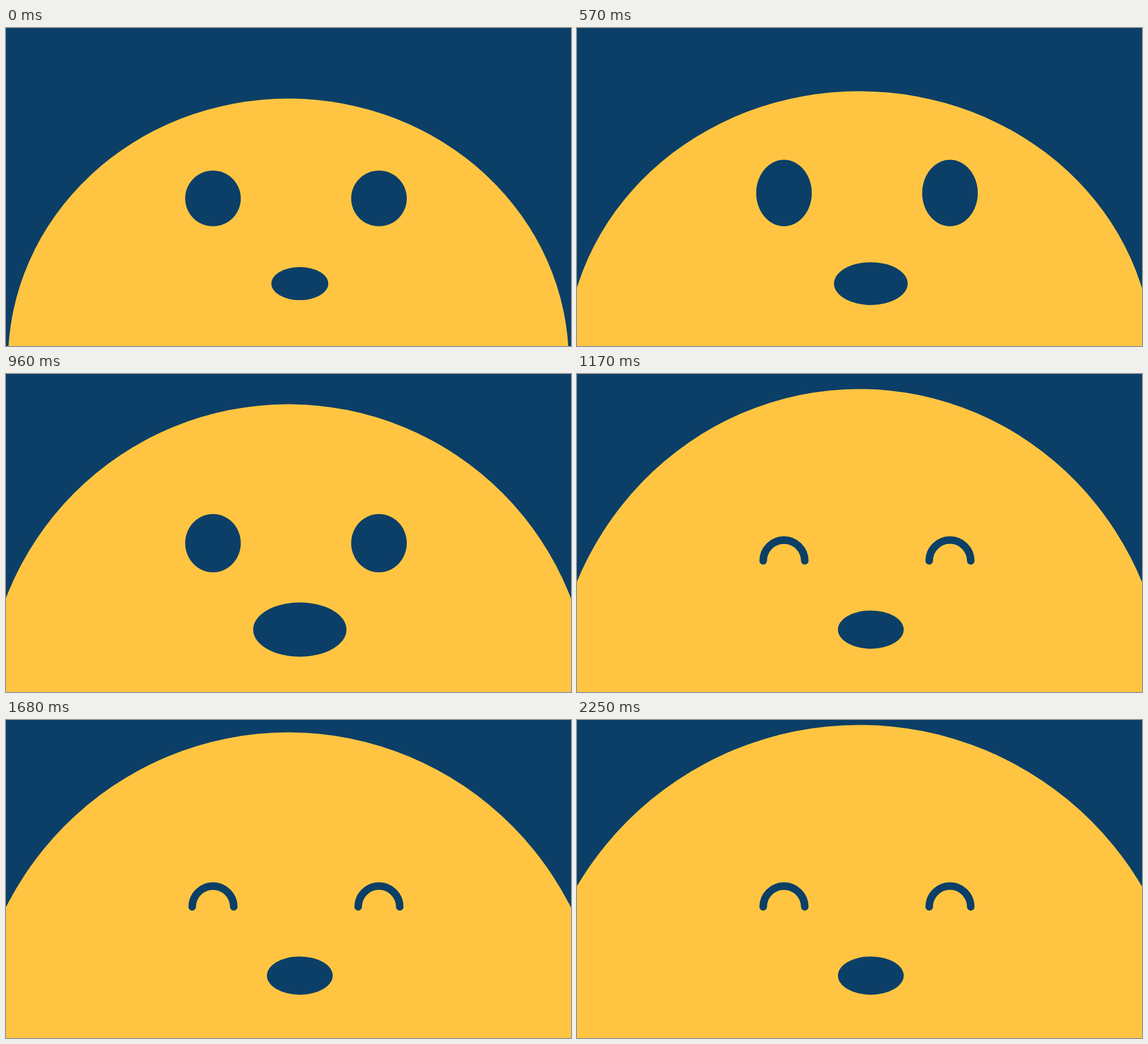
An HTML page for the animation above (2280 ms loop, 998 px wide and 561 px high).

```html
<!DOCTYPE html>
<html lang="en">
<head>
<meta charset="utf-8">
<title>Rising face</title>
<style>
  html, body { margin: 0; width: 100%; height: 100%; overflow: hidden; background: #0c3f67; }
  svg { display: block; width: 998px; height: 561px; fill: #0c3f67; }
  #smile { fill: none; stroke: #0c3f67; stroke-width: 13.4; stroke-linecap: round; }
</style>
</head>
<body>
<svg viewBox="0 0 998 561">
  <ellipse id="face" cx="498.8" cy="588.5" fill="#ffc542"/>
  <g id="eyes">
    <ellipse cx="365.6" rx="49.1"/>
    <ellipse cx="658.8" rx="49.1"/>
  </g>
  <path id="smile" d="M328.9 329.6a36.7 36.7 0 0 1 73.4 0M622.1 329.6a36.7 36.7 0 0 1 73.4 0"/>
  <ellipse id="mouth" cx="519" cy="450.9"/>
</svg>
<script>
const LOOP = 2280, STEP = 30, SMILE_AT = 990, EYE_BOTTOM = 349.8;
const [face, eyes, smile, mouth] = ['face', 'eyes', 'smile', 'mouth'].map(id => document.getElementById(id));

const progress = (t, from, to) => Math.min(Math.max((t - from) / (to - from), 0), 1);
const smooth = u => u * u * (3 - 2 * u);
const easeIn = u => u ** 1.35;
const easeOut = u => 1 - (1 - u) ** 1.6;

function set(el, attrs) {
  for (const name in attrs) el.setAttribute(name, attrs[name]);
}

function draw(t) {
  // Steady zoom with a slight swell halfway
  const u = t / LOOP;
  const radius = 495.2 + 85.7 * u + 4 * Math.sin(Math.PI * u) ** 2;

  // Crouch, spring up past round, settle
  const stretch = 0.937
    - 0.018 * smooth(progress(t, 250, 610))
    + 0.121 * easeIn(progress(t, 610, 1080))
    - 0.04 * easeOut(progress(t, 1080, 2160));
  set(face, { rx: radius, ry: radius * stretch });

  const happy = t >= SMILE_AT;
  eyes.style.display = happy ? 'none' : '';
  smile.style.display = happy ? '' : 'none';

  const eyeRy = 49.15 + t / 60 - Math.max(0, t - 810) * 0.0916;
  for (const eye of eyes.children) set(eye, { cy: EYE_BOTTOM - eyeRy, ry: eyeRy });

  const size = happy ? 1.155 : 1 + 0.907 * smooth(t / 1500);
  set(mouth, { rx: 50.3 * size, ry: 29.2 * size });
}

function tick() {
  draw(Math.floor(performance.now() % LOOP / STEP) * STEP);
  requestAnimationFrame(tick);
}
tick();
</script>
</body>
</html>
```
